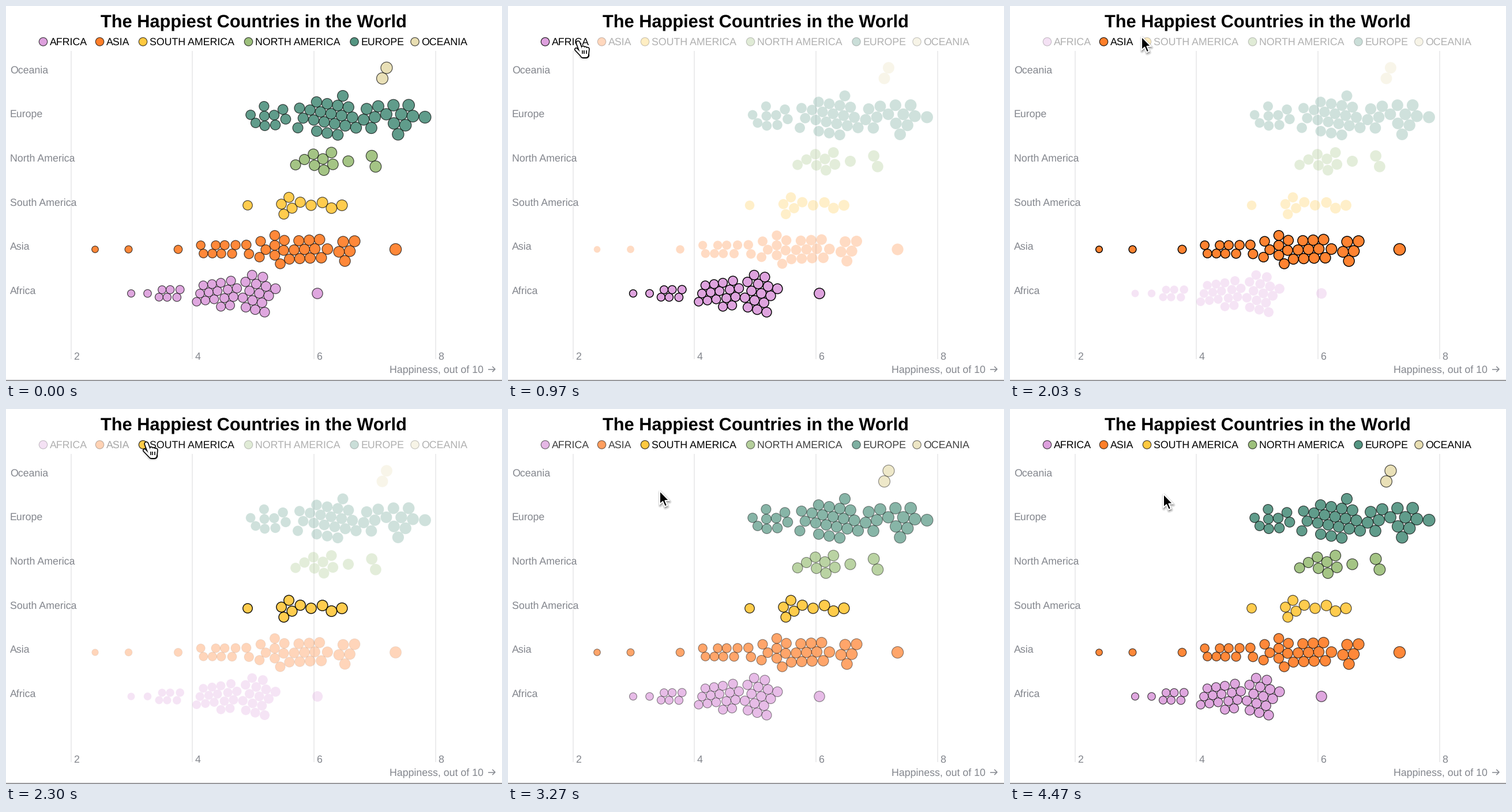
A matplotlib script for the animation above (4.51 s loop, 860 by 651 pixels).

```python
import numpy as np
import matplotlib.pyplot as plt
from matplotlib.animation import FuncAnimation
from matplotlib.collections import PatchCollection
from matplotlib.colors import to_rgba
from matplotlib.patches import Circle, Polygon
from matplotlib.transforms import Affine2D

W, H, DPI = 860, 651, 64
FRAMES, STEP = 110, 41
FADE = 300
PT = 72 / DPI  # points per pixel
GRAY = "#83868d"

plt.rcParams["font.family"] = "Liberation Sans"
plt.rcParams["text.hinting"] = "none"

# name, colour, legend dot x; rows climb in this order
GROUPS = [
    ("Africa", "#dda0dd", 64),
    ("Asia", "#ff7f2a", 162),
    ("South America", "#ffc940", 237),
    ("North America", "#9dc07c", 420),
    ("Europe", "#549582", 603.5),
    ("Oceania", "#e8deb2", 708.5),
]

# Each swarm: single dots and upright pairs on the row's axis (x only), then
# blocks of touching dots (x, drop below the axis, dots, strands, tilt).
SWARMS = {
    "Africa": ([217, 245.5, 540], [268, 282, 299], [
        (351.5, -2, 3, 3), (386.5, 7, 3, 2), (390, -22), (428, -10.5, 4, 1, 46),
        (441.5, 8, 4, 2, 46), (421, -26, 2, 1, 46), (448.5, 32.5)]),
    "Asia": ([154.5, 212.5, 298.5, 675.5], [361, 376, 395], [
        (340, 0, 2, 1, -72), (419, 0, 2, 1, -74), (445, 7, 2, 1, 50),
        (441.5, -14), (466, -7, 3, 1, 90), (482, -7, 2, 1, 86), (475.5, 25),
        (517.5, 0, 3, 3, 63), (552, 7, 2, 1, 55), (581, -4.5, 2),
        (596, 3, 3, 1, 64)]),
    "South America": ([419, 529, 582.5], [], [
        (484, -8, 2, 1, 42), (496, 5, 3, 1, 36), (556.5, 0, 2, 1, -32)]),
    "North America": ([593.5], [], [
        (517.5, -3, 3, 1, 31), (549.5, -4, 3, 1, 37), (559, 10.5, 2, 1, 33),
        (637.5, 0, 2, 1, -70)]),
    "Europe": ([726.5], [], [
        (428.5, 3, 2, 1, -58), (448, -2, 3, 1, -88), (466, 5, 2, 1, -83),
        (482.5, -5, 2, 1, -74), (557.8, 1, 6, 2, -10), (566, -21.5, 4, 1, -10),
        (557, 27.5, 3, 1, -10), (506, 18.5), (584, -37), (622.7, -5, 2, 1, 74),
        (639.5, 0, 3, 1, 72), (665.5, -13, 2, 1, 51), (689, 4.5, 2, 3, -69)]),
    "Oceania": ([], [656.2], []),
}

# Time at which each legend item takes the focus
FOCUS = [(-FADE, None), (500, "Africa"), (1120, "Asia"),
         (2040, "South America"), (3060, None)]

# Fill alpha, stroke alpha, stroke width, legend text alpha, legend stroke alpha
DIM = np.array([0.28, 0.0, 1.0, 0.31, 0.2])
BASE = np.array([0.93, 0.7, 1.2, 1.0, 0.7])
LIT = np.array([0.97, 1.0, 1.45, 1.0, 0.85])

# Pointer path: time, x, y
PATH = np.array([
    (40, 122, -45), (490, 111, 58), (940, 122, 61.5), (1250, 180, 62),
    (2000, 228, 53), (2200, 244, 58), (3020, 244, 58), (3230, 263, 142),
    (3580, 266, 147.5)])

ARROW = [(0, 0), (0, 23.5), (5.3, 18.6), (9, 27.3), (13, 25.6), (9.4, 17),
         (16.5, 17)]


def smooth(p):
    p = np.clip(p, 0, 1)
    return p * p * (3 - 2 * p)


def radius(x):
    score = 2 + (np.asarray(x) - 112.5) / 105.4
    return 3.72 * np.sqrt(score)


def block(x, drop=0, n=1, strands=1, tilt=68):
    """Honeycomb of touching dots, centred on (x, drop)."""
    a, b = np.radians([tilt, tilt - 60])
    i, j = np.mgrid[:n, :strands].reshape(2, -1)
    i, j = i - (n - 1) / 2, j - (strands - 1) / 2
    gap = 2 * radius(x)
    return np.column_stack([x + gap * (i * np.cos(a) + j * np.cos(b)),
                            drop - gap * (i * np.sin(a) + j * np.sin(b))])


def settle(dots):
    """Push overlapping dots apart until they only touch."""
    reach = np.add.outer(radius(dots[:, 0]), radius(dots[:, 0])) - 0.2
    for _ in range(40):
        d = dots[:, None] - dots[None]
        dist = np.hypot(*d.T).T + np.eye(len(dots)) * 1e6
        push = np.clip(reach - dist, 0, None) / dist
        dots = dots + 0.4 * (d * push[..., None]).sum(axis=1)
    return dots


def swarm_dots(name, y):
    singles, pairs, blocks = SWARMS[name]
    specs = [(x,) for x in singles] + [(x, 0, 2) for x in pairs] + blocks
    return settle(np.vstack([block(*s) for s in specs])) + (0, y)


def write(x, y, s, size=17.8, color=GRAY, **kw):
    return ax.text(x, y, s, fontsize=size * PT, color=color, va="baseline",
                   **kw)


def line(xs, ys, color, width, cap="butt", z=1, **kw):
    return ax.plot(xs, ys, color=color, lw=width * PT, zorder=z,
                   solid_capstyle=cap, **kw)[0]


def make_arrow():
    parts = [Polygon(np.add(ARROW, (0.8, 2.2)), fc=(0, 0, 0, 0.07),
                     ec=(0, 0, 0, 0.07), lw=w * PT) for w in (7, 5, 3, 1)]
    parts.append(Polygon(ARROW, fc="black", ec="white", lw=2 * PT))
    for p in parts:
        p.set(joinstyle="round", zorder=10)
        ax.add_patch(p)
    return parts


def make_hand():
    """Rounded strokes: index finger, thumb, palm and three folded fingers."""
    limbs = [((-0.6, 6), (2.4, 20), 5), ((-3.8, 5), (13.8, 23), 3.4),
             ((8.2, 12.6), (23, 23), 8)]
    limbs += [((8 + 3.9 * k, 9 + 3 * k), (11 + 1.1 * k, 21), 4.6)
              for k in range(3)]
    parts = []
    for xs, ys, w in limbs:
        parts.append(line(xs, np.add(ys, 2), "black", w + 6, "round", 9,
                          alpha=0.06))
        parts.append(line(xs, ys, "black", w + 3.2, "round", 10))
        parts.append(line(xs, ys, "white", w, "round", 11))
    for x in (6.8, 10.4, 14):
        parts.append(line([x, x], [15.5, 21.5], "black", 1.6, z=12))
    return parts


fig = plt.figure(figsize=(W / DPI, H / DPI), dpi=DPI, facecolor="white")
ax = fig.add_axes([0, 0, 1, 1])
ax.set_axis_off()

for i, tick in enumerate((2, 4, 6, 8)):
    x = 112.5 + 210.8 * i
    line([x, x], [78, 613], "#e7e7e8", 1.5)
    write(x + 4.3, 614, str(tick))
line([0, W], [650.2, 650.2], "#77777a", 1.5)

write(429, 36.3, "The Happiest Countries in the World", 30.8, "black",
      weight="bold", ha="center")
write(665, 636.6, "Happiness, out of 10")
line([836, 848], [630.5, 630.5], GRAY, 1.5)
line([843.3, 848, 843.3], [625.8, 630.5, 635.2], GRAY, 1.5)

marks = {}
for i, (name, color, lx) in enumerate(GROUPS):
    y = 499 - 76.5 * i
    write(7, y + 0.4, name)
    label = write(lx + 12, 67.8, name.upper(), color="black")
    swarm = PatchCollection([Circle(d, radius(d[0]))
                             for d in swarm_dots(name, y)], zorder=3)
    key = PatchCollection([Circle((lx, 61.5), 7.2)], zorder=3)
    ax.add_collection(swarm)
    ax.add_collection(key)
    marks[name] = color, swarm, key, label

arrow, hand = make_arrow(), make_hand()
ax.set_xlim(0, W)
ax.set_ylim(H, 0)
shift = Affine2D()
for part in arrow + hand:
    part.set_transform(shift + ax.transData)

# Legend items reach from their dot to a gap before the next one
starts = [g[2] for g in GROUPS] + [823]
ITEMS = [(a - 8, b - 22) for a, b in zip(starts, starts[1:])]


def look(name, focus):
    if focus is None:
        return BASE
    return LIT if focus == name else DIM


def style(name, t):
    k = max(i for i, (start, _) in enumerate(FOCUS) if t >= start)
    start, focus = FOCUS[k]
    before = look(name, FOCUS[max(k - 1, 0)][1])
    return before + (look(name, focus) - before) * smooth((t - start) / FADE)


def tip(t):
    k = np.clip(np.searchsorted(PATH[:, 0], t, side="right"),
                1, len(PATH) - 1)
    a, b = PATH[k - 1], PATH[k]
    return a[1:] + (b[1:] - a[1:]) * smooth((t - a[0]) / (b[0] - a[0]))


def draw(i):
    t = i * STEP
    for name, (color, swarm, key, label) in marks.items():
        fill, stroke, width, text, key_stroke = style(name, t)
        swarm.set_facecolor(to_rgba(color, fill))
        swarm.set_edgecolor((0, 0, 0, stroke))
        swarm.set_linewidth(width * PT)
        key.set_facecolor(to_rgba(color, text))
        key.set_edgecolor((0, 0, 0, key_stroke))
        key.set_linewidth(1.2 * PT)
        label.set_alpha(text)

    x, y = tip(t)
    shift.clear().translate(x, y)
    over = 50 <= y <= 72 and any(a <= x <= b for a, b in ITEMS)
    for part in hand:
        part.set_visible(over)
    for part in arrow:
        part.set_visible(not over)
    return []


anim = FuncAnimation(fig, draw, frames=FRAMES, interval=STEP, repeat=True,
                     repeat_delay=0, blit=False)
plt.show()
```
